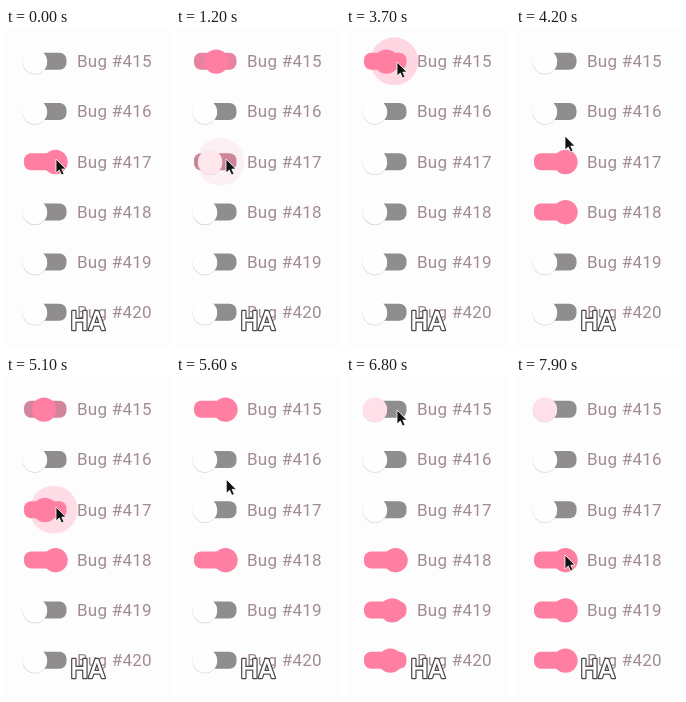
Write an HTML page that moves like this. It is 164 px wide and 320 px high and loops after 8 s.

```html
<!DOCTYPE html>
<html lang="en">
<head>
<meta charset="utf-8">
<title>Bug switches</title>
<style>
  html, body { margin: 0; width: 100%; height: 100%; overflow: hidden; background: #fdfdfd; }
  svg { display: block; width: 164px; height: 320px; }
  text { font-family: Roboto, sans-serif; }
  .label { font-size: 17px; letter-spacing: .25px; fill: #a18c93; }
  .laugh { font-size: 25px; font-weight: 500; fill: #fff; stroke: #48464a; stroke-width: 2.4px; paint-order: stroke; stroke-linejoin: round; }
</style>
</head>
<body>
<svg id="stage" viewBox="0 0 164 320">
  <g id="rows"></g>
  <text class="laugh" x="64.5" y="302">HA</text>
  <path id="cursor" d="M0 0V14L3.3 11L5.6 16L8 15L5.8 10.1H10Z" fill="#111" stroke="#fff" stroke-width=".8"/>
</svg>
<script>
const LOOP = 8000, STEP = 100, SLIDE = 400;
const OFF_X = 29, ON_X = 49.5;
const PINK = [255, 127, 162], WHITE = [255, 254, 254], GREY = [143, 141, 142];

// Switch changes: [start, on, clicked, leftover tint]
const rows = [
  { on: 0, moves: [[1068, 1], [3600, 0, 1], [5000, 1], [6400, 0, 1, .24]] },
  { on: 0, moves: [] },
  { on: 1, moves: [[1000, 0, 1], [3700, 1], [4980, 0, 1]] },
  { on: 0, moves: [[3700, 1]] },
  { on: 0, moves: [[6560, 1]] },
  { on: 0, moves: [[6600, 1]] }
];

// Pointer stops: [time, x, y]
const stops = [
  [0, 50, 131], [1500, 50, 131], [1800, 49, 118], [2000, 48, 116], [2700, 48, 116],
  [3300, 51, 34], [3800, 51, 34], [4200, 49, 108], [4500, 50, 131], [5400, 50, 131],
  [6100, 51, 34], [7100, 51, 34], [7900, 49, 179], [8000, 49, 179]
];

const clamp = v => Math.min(1, Math.max(0, v));
const ramp = (a, b, v) => clamp((v - a) / (b - a));
const mix = (a, b, k) => a + (b - a) * k;
const blend = (a, b, k) => `rgb(${a.map((v, i) => Math.round(mix(v, b[i], k)))})`;

function add(parent, tag, attrs) {
  const el = document.createElementNS('http://www.w3.org/2000/svg', tag);
  parent.append(el);
  set(el, attrs);
  return el;
}

function set(el, attrs) {
  for (const key in attrs) el.setAttribute(key, attrs[key]);
}

const list = document.getElementById('rows');
const cursor = document.getElementById('cursor');

rows.forEach((row, i) => {
  const y = 33.3 + i * 50.2;
  row.track = add(list, 'rect', { x: 18, y: y - 8.5, width: 42.5, height: 17, rx: 7 });
  row.ripple = add(list, 'circle', { cy: y, fill: '#ff7fa2' });
  row.shadow = add(list, 'circle', { cy: y + 1.1, r: 12.2, fill: '#ddd3d6' });
  row.thumb = add(list, 'circle', { cy: y + .3, r: 12.2 });
  add(list, 'text', { class: 'label', x: 71, y: y + 5.9 }).textContent = 'Bug #' + (415 + i);
});

function drawRow(row, t) {
  let place = row.on, thumb = row.on, track = row.on, ripple = 0, grow = 0, rippleX = ON_X;
  const move = row.moves.filter(m => t >= m[0] - 100).pop();
  if (move) {
    const [start, on, clicked, tint = 0] = move;
    const raw = (t - start) / SLIDE, p = clamp(raw);
    const eased = 1 - (1 - p) ** 2;
    place = on ? eased : 1 - eased;
    thumb = on ? clamp(p * 4) : mix(1, tint, ramp(.3, .55, p));
    track = on ? clamp(p * 2.4) : 1 - ramp(.3, .7, p);
    if (clicked) {
      grow = ramp(-.25, .15, raw);
      ripple = .3 * (1 - ramp(.25, .62, p));
      rippleX = mix(ON_X, OFF_X, p * p);
    }
  }
  const x = mix(OFF_X, ON_X, place);
  set(row.track, { fill: blend(GREY, PINK, track) });
  set(row.ripple, { cx: rippleX, r: 24 * grow, opacity: ripple });
  set(row.shadow, { cx: x - .2, opacity: 1 - thumb });
  set(row.thumb, { cx: x, fill: blend(WHITE, PINK, thumb) });
}

function drawCursor(t) {
  const i = stops.findIndex(s => s[0] > t);
  const [t0, x0, y0] = stops[i - 1], [t1, x1, y1] = stops[i];
  const k = ramp(t0, t1, t);
  set(cursor, { transform: `translate(${mix(x0, x1, k)} ${mix(y0, y1, k)})` });
}

const begin = performance.now();
function draw(now) {
  const t = Math.floor(Math.max(0, now - begin) % LOOP / STEP) * STEP;
  rows.forEach(row => drawRow(row, t));
  drawCursor(t);
  requestAnimationFrame(draw);
}
draw(begin);
</script>
</body>
</html>
```
